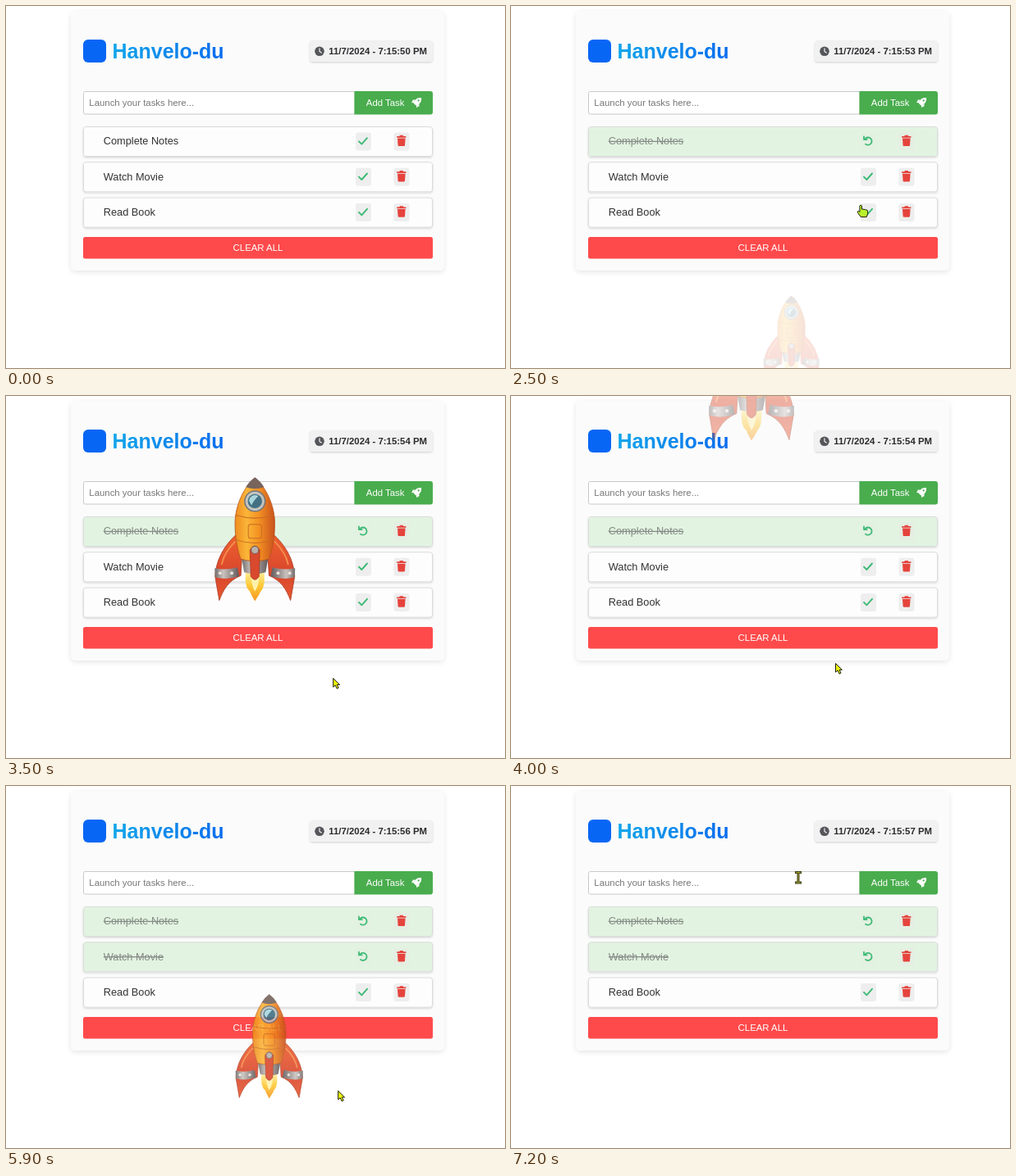
An HTML page for the animation above (7300 ms loop, 608 px wide and 442 px high).

```html
<!DOCTYPE html>
<html lang="en">
<head>
<meta charset="utf-8">
<title>Task list</title>
<style>
  html, body { margin: 0; width: 100%; height: 100%; overflow: hidden; background: #fff; }
  svg { display: block; width: 608px; height: 442px; }
  text { font: 11.4px "Liberation Sans", Arial, sans-serif; fill: #333; }
  .title { font-size: 25px; font-weight: bold; fill: url(#brand); }
  .clock { font-weight: bold; fill: #2b2b2d; }
  .hint { fill: #777; }
  .light { fill: #fff; }
  .label { font-size: 12.75px; }
  .done .label { fill: #858a85; text-decoration: line-through; }
  .done .tick, .undo { display: none; }
  .done .undo { display: inline; }
  .stroke { fill: none; stroke-linecap: round; stroke-linejoin: round; }
</style>
</head>
<body>
<svg viewBox="0 0 608 442" xmlns="http://www.w3.org/2000/svg">
  <defs>
    <linearGradient id="brand"><stop stop-color="#12a6ea"/><stop offset="1" stop-color="#0a6cee"/></linearGradient>
    <linearGradient id="hull">
      <stop stop-color="#ee8a1c"/><stop offset=".3" stop-color="#fbb536"/>
      <stop offset=".6" stop-color="#f4901f"/><stop offset="1" stop-color="#c94e1a"/>
    </linearGradient>
    <linearGradient id="fin" x2="0" y2="1">
      <stop stop-color="#f0602c"/><stop offset=".6" stop-color="#d8442a"/><stop offset="1" stop-color="#e8562c"/>
    </linearGradient>
    <linearGradient id="steel">
      <stop stop-color="#6f6a6a"/><stop offset=".35" stop-color="#c9c2bd"/><stop offset="1" stop-color="#5f5658"/>
    </linearGradient>
    <linearGradient id="fire" x2="0" y2="1">
      <stop stop-color="#fff0a0"/><stop offset=".5" stop-color="#ffc832"/><stop offset="1" stop-color="#f59420"/>
    </linearGradient>
    <filter id="soft" x="-10%" y="-30%" width="120%" height="170%">
      <feDropShadow dx="0" dy="1.2" stdDeviation="1.3" flood-opacity=".16"/>
    </filter>
    <filter id="lift" x="-5%" y="-5%" width="110%" height="110%">
      <feDropShadow dx="0" dy="2" stdDeviation="3" flood-opacity=".1"/>
    </filter>

    <g id="trash" fill="#e5433c">
      <path d="M-5.6 -5.6h3l.8-1.2h3.6l.8 1.2h3v1.8h-11.2z"/>
      <path d="M-4.8 -3h9.6l-.6 8.4q-.1 1.2-1.3 1.2h-5.8q-1.2 0-1.3-1.2z"/>
    </g>
    <path id="tick" class="stroke" d="M-5 .5L-1.6 3.9L5 -3.6" stroke-width="1.9"/>
    <g id="undo">
      <path class="stroke" d="M-3.6 -2.6A4.6 4.6 0 1 1 -3 3.8" stroke-width="1.8"/>
      <path class="stroke" d="M-5 -5.4V-1.7H-1.3" stroke-width="1.8"/>
    </g>

    <g id="fins">
      <path d="M-21 -82C-37 -68 -47 -50 -48 -30L-43 -1C-38 -14 -32 -25 -17 -31L-15 -66Z"
        fill="url(#fin)" stroke="#a5351d" stroke-width=".8"/>
      <path d="M-48.5 -40Q-36 -37 -21 -41L-19 -30Q-35 -25 -48 -29Z" fill="url(#steel)"/>
      <path class="stroke" d="M-24 -72Q-37 -59 -40 -45" stroke="#f58a4a" stroke-width="2"/>
      <circle cx="-42" cy="-34" r="2" fill="#e9e2dc"/><circle cx="-28" cy="-34" r="2" fill="#e9e2dc"/>
    </g>
    <g id="ship">
      <path d="M-11 -37Q-13 -17 -6 -12L-4 -7L0 0L5 -8L7 -12Q13 -18 11 -37Z" fill="url(#fire)"/>
      <path d="M-5 -37Q-5 -20 0 -12Q6 -20 5 -37Z" fill="#fff2ac"/>
      <use href="#fins"/><use href="#fins" transform="scale(-1 1)"/>
      <path d="M-16 -52H16L13 -35Q0 -31 -13 -35Z" fill="url(#steel)"/>
      <path d="M0 -149C-12 -140 -24 -117 -24 -94C-24 -76 -21 -62 -17 -51Q0 -46 17 -51C21 -62 24 -76 24 -94C24 -117 12 -140 0 -149Z"
        fill="url(#hull)" stroke="#b6531b" stroke-width=".8"/>
      <path d="M0 -150Q-7 -145 -11 -138Q0 -134 11 -138Q7 -145 0 -150Z" fill="#75625b"/>
      <path class="stroke" d="M-23 -104Q0 -97 23 -104M-22 -74Q0 -67 22 -74" stroke="#c66a20" stroke-width="1"/>
      <rect x="-8" y="-93" width="16" height="17" rx="3" fill="none" stroke="#c96a1f"/>
      <path d="M-6 -62Q0 -72 6 -62L5 -30Q0 -22 -5 -30Z" fill="#d8472a" stroke="#a5351d" stroke-width=".7"/>
      <circle cy="-62" r="4.5" fill="#b9b0aa" stroke="#70605b"/>
      <circle cy="-121" r="13" fill="#6f7479"/>
      <circle cy="-121" r="11.5" fill="#c3c2bd"/>
      <circle cy="-121" r="8.6" fill="#3f6f82"/>
      <path d="M-7 -121A7 7 0 0 1 4 -127Q-2 -121 -4 -116Z" fill="#a9d5dc"/>
    </g>
  </defs>

  <rect x="79" y="6" width="455" height="317" rx="6" fill="#fbfbfb" filter="url(#lift)"/>
  <rect x="94" y="41" width="28" height="28" rx="6" fill="#0866f5"/>
  <text class="title" x="129.5" y="64">Hanvelo-du</text>

  <rect x="370" y="42" width="150" height="26" rx="4" fill="#f1f1f2" filter="url(#soft)"/>
  <circle cx="382" cy="55.3" r="5.8" fill="#55565a"/>
  <path class="stroke" d="M382 51.8V55.5L384.3 57" stroke="#f1f1f2" stroke-width="1.2"/>
  <text class="clock" id="clock" x="393.3" y="59"></text>

  <path d="M425 104.5H96.5Q94.5 104.5 94.5 106.5V130Q94.5 132 96.5 132H425Z" fill="#fff" stroke="#c9c9c9"/>
  <text class="hint" x="101.3" y="122">Launch your tasks here...</text>
  <path d="M424.5 104H517Q520 104 520 107V129.5Q520 132.5 517 132.5H424.5Z" fill="#49ac4d"/>
  <text class="light" x="438.8" y="122">Add Task</text>
  <g transform="translate(500.3 117.8)" fill="#fff">
    <path d="M5.8 -5.8C1.8 -6.2 -.8 -4.6 -2.6 -1.8L-3.8 .8L-.8 3.8L1.8 2.6C4.8 .8 6.2 -1.8 5.8 -5.8Z"/>
    <path d="M-2 -3.2H-4.4L-6.2 .4L-3.4 .2ZM3.2 2V4.4L-.4 6.2L-.2 3.4Z"/>
    <circle cx="2.4" cy="-2.4" r="1.1" fill="#49ac4d"/>
  </g>

  <g id="rows"></g>

  <rect x="94" y="282" width="426" height="26.5" rx="2.5" fill="#fe4a4b"/>
  <text class="light" x="307" y="299" text-anchor="middle">CLEAR ALL</text>

  <use id="rocket" href="#ship"/>

  <g id="cursor" stroke="#1c1c10" stroke-linejoin="round">
    <path data-kind="arrow" d="M.5 .5V11.2L3 9L5 13.2L7 12.2L5.1 8.3H8.4Z" fill="#eaf20c"/>
    <path data-kind="hand" fill="#b9f22a" d="M-1.3 1Q0 -1 1.3 1V5.2Q2.7 4.4 3.8 5.6Q5.2 4.8 6.2 6Q8 5.4 8.4 7.2V10.6L7 14.6H0L-3.6 9.6Q-4.6 7.4 -2.8 7.2L-1.3 8.6Z"/>
    <g data-kind="beam" fill="none">
      <path d="M-4 -6.5H4M-4 6H4M0 -6.5V6" stroke-width="3" stroke="#3a3a18"/>
      <path d="M-3.2 -6.5H3.2M-3.2 6H3.2M0 -6.5V6" stroke-width="1" stroke="#a3a028"/>
    </g>
  </g>
</svg>

<script>
const LOOP = 7300, LAUNCHES = [2200, 5170];
const $ = id => document.getElementById(id);

// Row: label, top, time completed, hover start and end
const tasks = [
  ["Complete Notes", 147, LAUNCHES[0], 1150, 2300],
  ["Watch Movie", 190.3, LAUNCHES[1], 4500, 5300],
  ["Read Book", 233.6, Infinity, 5300, 5380]
];

// Flight: ms since launch, x, bottom y, scale, opacity
const flight = [
  [0, 352, 505, .62, 0], [170, 347, 480, .66, .04], [800, 318, 368, .87, .93],
  [1230, 305, 272, 1, 1], [1500, 299, 178, 1.03, .85],
  [1800, 293, 55, 1.07, .42], [2150, 288, -90, 1.1, 0]
];

// Pointer: ms, x, y
const route = [
  [1000, 441, 176], [1250, 431, 168], [2200, 431, 168], [2600, 424, 272],
  [3000, 414, 356], [3200, 408, 378], [3700, 395, 326], [4000, 395, 326],
  [4600, 431, 211], [5150, 432, 211], [5300, 432, 255], [5650, 418, 345],
  [6000, 399, 375], [6400, 382, 312], [6800, 366, 230], [7200, 350, 112], [7300, 350, 112]
];

const clamp = v => Math.max(0, Math.min(1, v));

// Smooth interpolation that never overshoots between points
function sample(points, t) {
  const last = points.length - 1;
  if (t <= points[0][0]) return points[0].slice(1);
  if (t >= points[last][0]) return points[last].slice(1);
  const i = points.findIndex(p => p[0] > t) - 1;
  const a = points[i], b = points[i + 1], span = b[0] - a[0], u = (t - a[0]) / span;
  return a.slice(1).map((from, n) => {
    const k = n + 1;
    const slope = j => (points[j + 1][k] - points[j][k]) / (points[j + 1][0] - points[j][0]);
    const tangent = j => {
      if (j === 0) return slope(0);
      if (j === last) return slope(last - 1);
      const p = slope(j - 1), q = slope(j);
      return p * q > 0 ? 2 * p * q / (p + q) : 0;
    };
    const rest = 1 - u;
    return from * (1 + 2 * u) * rest * rest + b[k] * u * u * (3 - 2 * u)
      + span * u * rest * (tangent(i) * rest - tangent(i + 1) * u);
  });
}

function mix(from, to, k) {
  return `rgb(${from.map((v, i) => Math.round(v + (to[i] - v) * k))})`;
}

$("rows").innerHTML = tasks.map(([label, y]) => `
  <g class="row" transform="translate(0 ${y})">
    <rect class="box" x="94.5" y=".5" width="425" height="36" rx="3" stroke="#dadcda" filter="url(#soft)"/>
    <text class="label" x="118.8" y="22.4">${label}</text>
    <rect class="check" x="426" y="7.5" width="19" height="22" rx="3"/>
    <g class="mark" transform="translate(435 17.8)">
      <use class="tick" href="#tick"/><use class="undo" href="#undo"/>
    </g>
    <rect class="bin" x="472.5" y="7.5" width="19" height="22" rx="3"/>
    <use href="#trash" x="481.8" y="17.5"/>
  </g>`).join("");

const rows = [...document.querySelectorAll(".row")].map(el => ({
  el,
  box: el.querySelector(".box"),
  check: el.querySelector(".check"),
  mark: el.querySelector(".mark"),
  bin: el.querySelector(".bin")
}));
const shapes = [...document.querySelectorAll("[data-kind]")];

function drawRow(row, [, , doneAt, on, off], t) {
  const done = clamp((t - doneAt) / 120);
  const hover = clamp((t - on) / 150) * (1 - clamp((t - off) / 150));
  const plate = [238, 238, 238].map((v, i) => v + ([227, 241, 225][i] - v) * done);
  row.el.classList.toggle("done", t >= doneAt);
  row.box.setAttribute("fill", mix([253, 253, 253], [226, 244, 225], done));
  row.bin.setAttribute("fill", mix([238, 238, 238], [229, 238, 226], done));
  row.check.setAttribute("fill", mix(plate, [203, 236, 206], hover));
  row.mark.setAttribute("stroke", mix([62, 186, 118], [22, 132, 232], hover));
}

function drawRocket(t) {
  const start = t < LAUNCHES[1] ? LAUNCHES[0] : LAUNCHES[1];
  const [x, y, scale, alpha] = sample(flight, t - start);
  $("rocket").setAttribute("transform", `translate(${x} ${y}) scale(${scale})`);
  $("rocket").setAttribute("opacity", alpha);
}

function cursorKind(x, y) {
  const inside = (l, t, r, b) => x >= l && x <= r && y >= t && y <= b;
  if (inside(94, 104, 424, 132)) return "beam";
  const onCheck = tasks.some(([, top]) => inside(426, top + 7, 445, top + 30));
  return onCheck || inside(94, 282, 520, 308) ? "hand" : "arrow";
}

function drawCursor(t) {
  const [x, y] = sample(route, t), kind = cursorKind(x, y);
  $("cursor").setAttribute("visibility", t < route[0][0] ? "hidden" : "visible");
  $("cursor").setAttribute("transform", `translate(${x} ${y})`);
  for (const s of shapes) s.style.display = s.dataset.kind === kind ? "" : "none";
}

function draw(t) {
  $("clock").textContent = `11/7/2024 - 7:15:${50 + Math.floor((t + 650) / 1000)} PM`;
  rows.forEach((row, i) => drawRow(row, tasks[i], t));
  drawRocket(t);
  drawCursor(t);
}

const begun = performance.now();
function frame() {
  draw((performance.now() - begun) % LOOP);
  requestAnimationFrame(frame);
}
frame();
</script>
</body>
</html>
```
